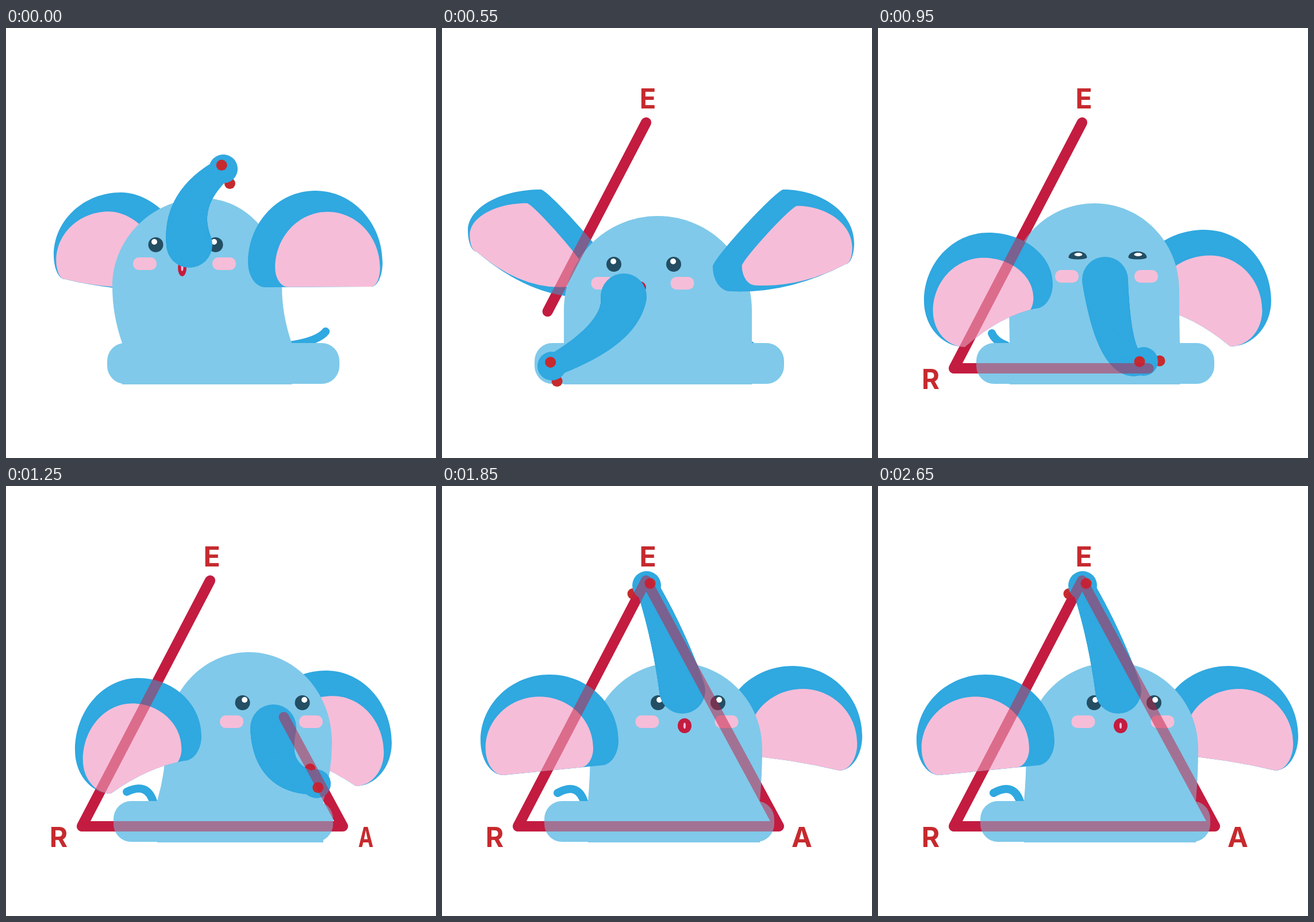
Write an HTML page with a canvas that moves like this. It is 748 px wide and 748 px high and loops after 2.7 s.

```html
<!DOCTYPE html>
<html>
<head>
<meta charset="utf-8">
<style>
  html, body { margin: 0; width: 748px; height: 748px; overflow: hidden; background: #fff; }
  canvas { display: block; }
</style>
</head>
<body>
<canvas width="748" height="748"></canvas>
<script>
const ctx = document.querySelector('canvas').getContext('2d');
const LOOP = 2700, STEP = 50, TURN = 700;
const BODY = '#80c9ea', BLUE = '#30a8e0', PINK = '#f6bdd8', EYE = '#234e63', RED = '#c62a2e', CRIMSON = '#c41c40';
const ROUND = 0.5523;

// Key poses: each row belongs to one of these times
const POSES = [0, 350, 550, 950, 1250, 1550];
const TRUNK_TIMES = [0, 350, 550, 650, 950, 1100, 1250, 1550];

// top, left, right, side y, lean of the feet, half width of the base
const body = [
  [296, 185, 480, 450, 17, 202],
  [296, 227, 517, 440, 2, 208],
  [327, 212, 539, 491, 0, 217],
  [305, 228, 524, 455, 1, 207],
  [289, 278, 567, 445, -15, 191],
  [307, 258, 557, 456, -4, 200]];

// centre between the eyes, mouth radii
const face = [
  [312.5, 377, 7.5, 15], [320.5, 382, 16, 7.5], [351, 411, 10, 10],
  [399.5, 399, 10, 10], [463.5, 377, 10, 10], [428, 377, 12, 13]];

// centre x, top, half width, centre y, drop of the head side
const leftEar = [
  [200, 286, 117, 395, 18], [170, 322, 106, 418, 0], [172, 281, 127, 352, 72],
  [192, 356, 112, 475, -30], [230, 334, 110, 460, -25], [187, 328, 120, 443, 0]];
const rightEar = [
  [538, 283, 117, 408, 0], [536, 322, 109, 445, -30], [594, 281, 123, 374, 41],
  [568, 351, 116, 474, -30], [557, 321, 114, 447, -25], [610, 313, 121, 435, -10]];
const earDroop = [[42], [56], [37], [80], [75], [60]];

// end offset from the foot, curl
const tail = [[61, -24, 0], [32, -37, 0], [-30, 20, 0], [-25, -21, 0], [-47, -20, 1], [-47, -18, 1]];

// root, bend and tip
const trunk = [
  [319, 377, 300, 300, 378, 245],
  [336, 386, 329, 290, 375, 195],
  [316, 467, 312, 531, 191, 588],
  [328, 468, 285, 550, 160, 608],
  [395, 438, 412, 605, 462, 580],
  [440, 426, 440, 565, 566, 578],
  [465, 420, 457, 508, 540, 518],
  [418, 356, 395, 260, 356, 173]];
const pencilAngle = [[66], [100], [71], [-2], [-113], [-211]];

const LETTERS = [['E', 358, 140, 370], ['R', 91.5, 628, 760], ['A', 626, 628, 1160]];
const CORNERS = [[355, 164.5], [132, 592], [586, 592], [355, 164.5]];
const LEG_TIMES = [198, 656, 1050, 1500];

const clamp = x => Math.max(0, Math.min(1, x));
const mix = (a, b, u) => a + (b - a) * u;

// Smooth interpolation through keyed rows of numbers
function pose(rows, t, times = POSES) {
  const last = times.length - 1;
  if (t >= times[last]) return rows[last];
  const i = times.findIndex((_, k) => t < times[k + 1]);
  const span = times[i + 1] - times[i], u = (t - times[i]) / span;
  const slope = (k, j) => k === 0 || k === last ? 0
    : (rows[k + 1][j] - rows[k - 1][j]) / (times[k + 1] - times[k - 1]) * span;
  return rows[i].map((a, j) => mix(a, rows[i + 1][j], u * u * (3 - 2 * u))
    + slope(i, j) * u * (1 - u) ** 2 - slope(i + 1, j) * u * u * (1 - u));
}

function ellipse(x, y, rx, ry, color) {
  ctx.fillStyle = color;
  ctx.beginPath();
  ctx.ellipse(x, y, rx, ry, 0, 0, 7);
  ctx.fill();
}

function box(x, y, w, h, r, color) {
  ctx.fillStyle = color;
  ctx.beginPath();
  ctx.roundRect(x, y, w, h, r);
  ctx.fill();
}

// Quarter arcs: one leaves vertically, the other horizontally
function arcFromSide(x0, y0, x1, y1, k = ROUND) {
  ctx.bezierCurveTo(x0, mix(y0, y1, k), mix(x1, x0, k), y1, x1, y1);
}
function arcFromTop(x0, y0, x1, y1, k = ROUND) {
  ctx.bezierCurveTo(mix(x0, x1, k), y0, x1, mix(y1, y0, k), x1, y1);
}

// The pink inside is the same outline shrunk towards the outer tip
function drawEar(rows, t) {
  const out = rows === rightEar ? 1 : -1;
  const [cx, top, rx, cy, drop] = pose(rows, t), [droop] = pose(earDroop, t);
  const side = cx + out * rx, head = cx - out * rx, headY = cy + drop;
  const tipX = side - out * droop * droop / 90, tipY = cy + droop;
  const cornerX = head + out * 30, cornerY = headY + 43;
  const outline = () => {
    ctx.beginPath();
    ctx.moveTo(side, cy);
    arcFromSide(side, cy, cx, top);
    arcFromTop(cx, top, head, headY, ROUND - 0.45 * clamp((drop - 15) / 25));
    arcFromSide(head, headY, cornerX, cornerY);
    ctx.quadraticCurveTo((cornerX + tipX) / 2, (cornerY + tipY) / 2 + drop * 0.7, tipX, tipY);
    arcFromTop(tipX, tipY, side, cy);
  };
  ctx.save();
  outline();
  ctx.fillStyle = BLUE;
  ctx.fill();
  ctx.clip();
  ctx.translate(tipX, tipY);
  ctx.scale(0.78, 0.78);
  ctx.translate(-tipX, -tipY);
  outline();
  ctx.fillStyle = PINK;
  ctx.fill();
  ctx.restore();
}

function drawTail(t) {
  const [, left, right, , lean] = pose(body, t);
  const [dx, dy, curl] = pose(tail, t);
  const x = t < TURN ? right + lean - 2 : left + lean - 6, y = 552;
  ctx.strokeStyle = BLUE;
  ctx.lineWidth = 14;
  ctx.beginPath();
  ctx.moveTo(x, y);
  ctx.quadraticCurveTo(x + dx * mix(0.8, 0.22, curl), y - mix(8, 38, curl), x + dx, y + dy);
  ctx.stroke();
}

function drawBody(t) {
  const [top, left, right, side, lean, half] = pose(body, t);
  const x = (left + right) / 2 + Math.max(0, lean) * 0.6, baseY = 548, knee = (side + baseY) / 2;
  ctx.fillStyle = BODY;
  ctx.beginPath();
  ctx.moveTo(left + lean, 620);
  ctx.lineTo(left + lean, baseY);
  ctx.quadraticCurveTo(left, knee, left, side);
  arcFromSide(left, side, x, top);
  arcFromTop(x, top, right, side);
  ctx.quadraticCurveTo(right, knee, right + lean, baseY);
  ctx.lineTo(right + lean, 620);
  ctx.fill();
  box(378 - half, baseY, half * 2, 619 - baseY, 31, BODY);
}

function drawFace(t) {
  const [x, y, mouthRx, mouthRy] = pose(face, t);
  const blink = clamp(1 - Math.abs(t - 950) / 120);
  for (const s of [-1, 1]) {
    const ex = x + s * 52, rx = 13 + 3 * blink;
    ctx.fillStyle = EYE;
    ctx.beginPath();
    ctx.ellipse(ex, y, rx, 13 - 2.5 * blink, 0, Math.PI, 2 * Math.PI);
    ctx.ellipse(ex, y, rx, 13 - 9.5 * blink, 0, 0, Math.PI);
    ctx.fill();
    ellipse(ex + (x - 375) / 25, y - 5, 5 + 2 * blink, 5 - 2 * blink, '#fff');
    box(x - 22.5 + s * 69, y + 22, 41, 22, 10.5, PINK);
  }
  ellipse(x - 6, y + 40, mouthRx, mouthRy, CRIMSON);
  ellipse(x - 6, y + 40, 2 + 2 * Math.max(0, mouthRx - 12), mouthRy * 0.4, PINK);
}

function drawTrunk(t) {
  const [x0, y0, cx, cy, x1, y1] = pose(trunk, t, TRUNK_TIMES);
  const angle = pose(pencilAngle, t)[0] * Math.PI / 180;
  const pencilEnd = d => ellipse(x1 + d * Math.cos(angle), y1 + d * Math.sin(angle), 9.5, 9.5, RED);
  pencilEnd(28);
  for (let u = 0; u <= 1; u += 1 / 90) {
    const r = mix(40, 19, u);
    ellipse(mix(mix(x0, cx, u), mix(cx, x1, u), u), mix(mix(y0, cy, u), mix(cy, y1, u), u), r, r, BLUE);
  }
  ellipse(x1, y1, 25, 25, BLUE);
  pencilEnd(-7);
}

function drawTriangle(t, alpha) {
  if (t <= LEG_TIMES[0]) return;
  ctx.globalAlpha = alpha;
  ctx.strokeStyle = CRIMSON;
  ctx.lineWidth = 18;
  ctx.beginPath();
  ctx.moveTo(...CORNERS[0]);
  for (let i = 0; i < 3 && t > LEG_TIMES[i]; i++) {
    const u = clamp((t - LEG_TIMES[i]) / (LEG_TIMES[i + 1] - LEG_TIMES[i]));
    const [x, y] = CORNERS[i], [nx, ny] = CORNERS[i + 1];
    ctx.lineTo(mix(x, nx, u), mix(y, ny, u));
  }
  ctx.stroke();
  ctx.globalAlpha = 1;
}

function drawLetters(t) {
  ctx.fillStyle = RED;
  ctx.font = '700 48px Inter, sans-serif';
  ctx.textAlign = 'center';
  for (const [letter, x, y, start] of LETTERS) {
    const width = 1 - (1 - clamp((t - start) / 250)) ** 3;
    if (!width) continue;
    ctx.save();
    ctx.translate(x, y);
    ctx.scale(width, 1);
    ctx.fillText(letter, 0, 0);
    ctx.restore();
  }
}

function draw() {
  const t = Math.floor(performance.now() % LOOP / STEP) * STEP;
  const [backEar, frontEar] = t < TURN ? [leftEar, rightEar] : [rightEar, leftEar];
  ctx.clearRect(0, 0, 748, 748);
  ctx.lineCap = ctx.lineJoin = 'round';
  drawLetters(t);
  drawTriangle(t, 1);
  drawTail(t);
  drawEar(backEar, t);
  drawBody(t);
  drawFace(t);
  drawEar(frontEar, t);
  drawTrunk(t);
  drawTriangle(t, 0.5);
  requestAnimationFrame(draw);
}
draw();
</script>
</body>
</html>
```
